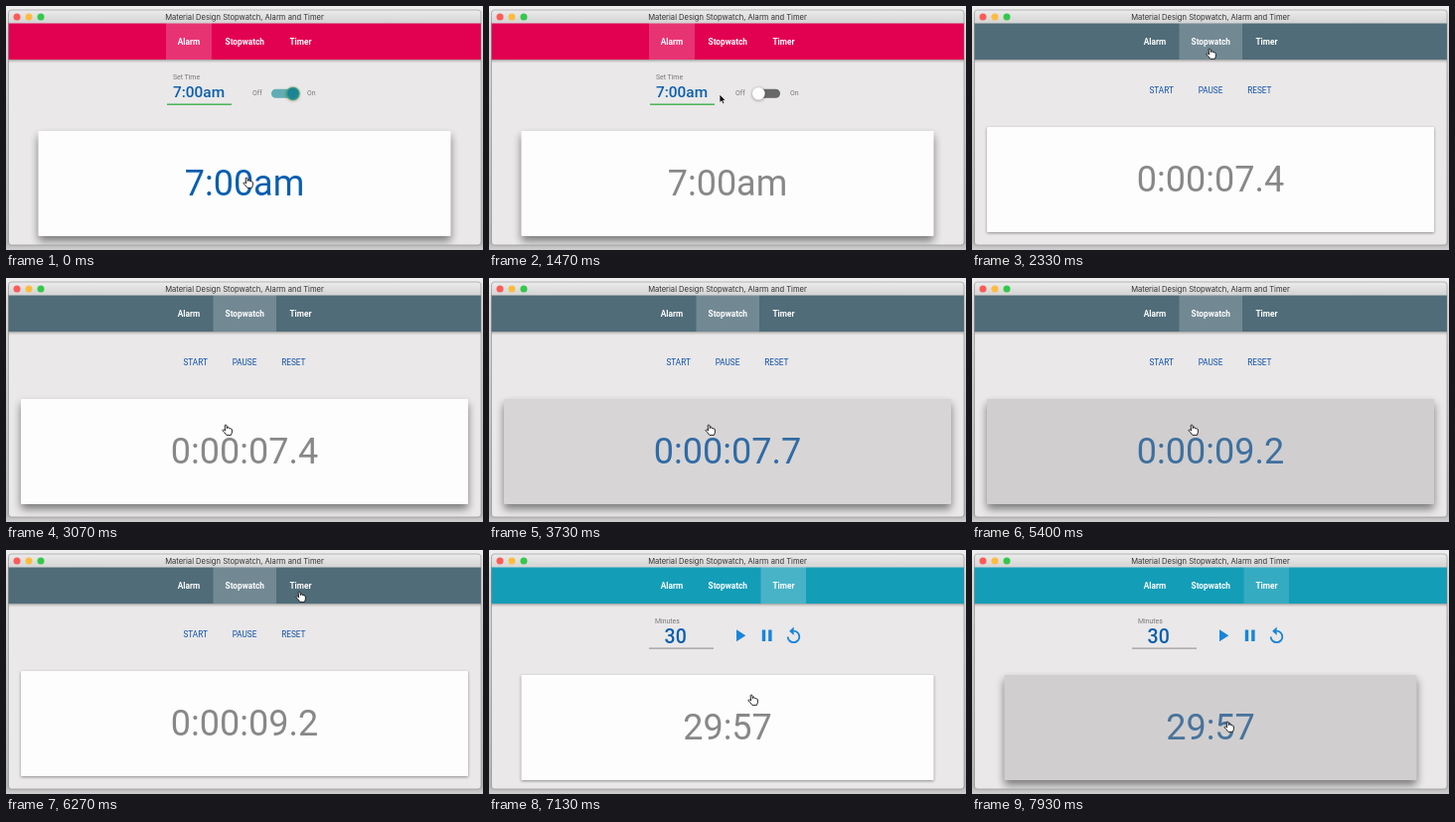
Recreate the animation shown at these times as an HTML page. Size 480x246 px, loop 8 s.

```html
<!DOCTYPE html>
<html lang="en">
<head>
<meta charset="utf-8">
<title>Stopwatch, Alarm and Timer</title>
<style>
  html, body { margin: 0; width: 100%; height: 100%; overflow: hidden; background: #dcdcdc; }
  svg { display: block; width: 100vw; height: 100vh; }
  text { font-family: Roboto, Arial, sans-serif; }
  .title { font: 7.6px Inter, sans-serif; fill: #333; }
  .tab { font-size: 8.3px; font-weight: 600; fill: #fff; }
  .label { font-size: 6.9px; fill: #777; }
  .button { font-size: 8.2px; fill: #0d4fa8; }
  .field { font-weight: 500; fill: #0a5fae; }
  .big { font-size: 36px; }
  .mid { text-anchor: middle; }
  .icon { fill: #1785d8; }
</style>
</head>
<body>
<svg viewBox="0 0 480 246" preserveAspectRatio="none">
  <defs>
    <linearGradient id="bar" x2="0" y2="1">
      <stop stop-color="#ececec"/><stop offset="1" stop-color="#d3d3d3"/>
    </linearGradient>
    <linearGradient id="desk" x2="0" y2="1">
      <stop stop-color="#efefef"/><stop offset=".1" stop-color="#d8d8d8"/>
      <stop offset=".97" stop-color="#b4b4b4"/><stop offset="1" stop-color="#d0d0d0"/>
    </linearGradient>
    <filter id="soft" x="-10%" y="-30%" width="120%" height="160%"><feGaussianBlur stdDeviation="1.5"/></filter>
    <filter id="deep" x="-10%" y="-30%" width="120%" height="160%"><feGaussianBlur stdDeviation="4.5"/></filter>
    <clipPath id="win"><rect x="2.5" y="4" width="475.5" height="237" rx="3"/></clipPath>
  </defs>

  <rect width="480" height="246" fill="url(#desk)"/>
  <g clip-path="url(#win)">
    <rect y="4" width="480" height="240" fill="#eae8e9"/>
    <rect y="17" width="480" height="38" opacity=".4" filter="url(#soft)"/>
    <rect id="head" y="17" width="480" height="37"/>
    <rect id="active" y="17" height="37" fill="#fff"/>
    <g class="mid">
      <text class="tab" x="184" y="38.5">Alarm</text>
      <text class="tab" x="240.3" y="38.5">Stopwatch</text>
      <text class="tab" x="296.5" y="38.5">Timer</text>
    </g>
    <rect y="4" width="480" height="13.5" fill="url(#bar)"/>
    <circle cx="11" cy="11" r="3.5" fill="#fc5b57"/>
    <circle cx="23" cy="11" r="3.5" fill="#fdbc40"/>
    <circle cx="35" cy="11" r="3.5" fill="#34c84a"/>
    <text class="title mid" x="240" y="13.8">Material Design Stopwatch, Alarm and Timer</text>

    <g class="view">
      <text class="label" x="168" y="74">Set Time</text>
      <text class="field" x="168" y="92" font-size="15.4">7:00am</text>
      <rect x="162" y="98.5" width="65" height="1.4" fill="#3cb14a"/>
      <text class="label" x="248" y="90.3">Off</text>
      <text class="label" x="303" y="90.3">On</text>
      <rect id="track" x="267" y="83.7" width="26" height="9" rx="4.5"/>
      <circle cy="89" r="6.8" id="knobShade" opacity=".3" filter="url(#soft)"/>
      <circle id="knob" cy="88.3" r="6.3"/>
    </g>
    <g class="view mid">
      <text class="button" x="190.6" y="88">START</text>
      <text class="button" x="240" y="88">PAUSE</text>
      <text class="button" x="289.3" y="88">RESET</text>
    </g>
    <g class="view">
      <text class="label" x="167" y="74">Minutes</text>
      <text class="field mid" x="187.7" y="93.5" font-size="19.5">30</text>
      <rect x="161" y="98.6" width="65" height="1" fill="#8a8a8a"/>
      <path class="icon" d="M249 80.3V92.2L258.3 86.2ZM274.8 80.5h3.4v11.6h-3.4ZM281.2 80.5h3.4v11.6h-3.4Z"/>
      <path d="M306.5 81.6A5.8 5.8 0 1 1 300.7 87.4" fill="none" stroke="#1785d8" stroke-width="1.8"/>
      <path class="icon" d="M306.7 77.4V86L302.2 81.7Z"/>
    </g>

    <rect class="box" id="low" height="106" fill="#000" filter="url(#soft)"/>
    <rect class="box" id="high" height="106" fill="#000" filter="url(#deep)"/>
    <rect class="box" id="card" height="106" rx="1"/>
    <text class="big mid" id="big" x="240"></text>
  </g>
  <rect x="2.5" y="4" width="475.5" height="237" rx="3" fill="none" stroke="#777" stroke-width=".7" opacity=".7"/>

  <g id="cursor" stroke-linejoin="round">
    <path id="arrow" d="M0 0V8.6L2 6.8L3.4 9.8L5 9.1L3.6 6.2H6.2Z" fill="#111" stroke="#fff" stroke-width=".7"/>
    <path id="hand" d="M-.9 .9C-.9-.3 .9-.3 1 .9L1.4 3.6C2-.1+3.1 3 3.3 3.8C4 3.3 4.9 3.5 5 4.2C5.8 3.9 6.5 4.3 6.5 5.1L6.3 8L5.4 10.4H.9L-1.4 7.5L-2.9 5.9C-3.2 5-2.2 4.5-1.4 5.1L-.4 6Z" fill="#fff" stroke="#111" stroke-width=".9"/>
  </g>
</svg>

<script>
const LOOP = 8;
const $ = id => document.getElementById(id);
const all = sel => [...document.querySelectorAll(sel)];
const set = (el, attrs) => { for (const k in attrs) el.setAttribute(k, attrs[k]); };
const clamp = p => Math.max(0, Math.min(1, p));
const lerp = (a, b, p) => a + (b - a) * p;
const smooth = p => p * p * (3 - 2 * p);
const out = p => 1 - (1 - p) ** 2;
const ramp = (t, from, dur) => clamp((t - from) / dur);
const mix = (a, b, p) => `rgb(${a.map((v, i) => Math.round(lerp(v, b[i], p)))})`;

const GREY = [136, 136, 136], BLUE = [8, 94, 176];
const WHITE = [254, 253, 254], PRESSED = [208, 206, 207];

const VIEWS = [
  { start: 0, color: [226, 0, 80], tab: [161, 46], card: [32.5, 126, 415], base: 191 },
  { start: 2, color: [79, 108, 120], tab: [208.5, 63.5], card: [15, 122, 450], base: 187 },
  { start: 6.45, color: [20, 157, 183], tab: [273.5, 45.5], card: [32.5, 126, 415], base: 191 }
];

const PRESSES = [0.07, 3.36, 5.18, 7.67];
const HOVER = [[0, 1], [1.5, 1], [1.8, 0], [2.6, 0], [2.9, 1], [5.85, 1], [6.15, 0], [7.15, 0], [7.45, 1]];
const POINTER = [
  [0, 242, 173], [1.4, 242, 173], [1.47, 232, 89], [1.72, 239, 43], [2.33, 239, 43], [2.75, 221, 148],
  [5.76, 221, 148], [6.15, 295, 42], [6.67, 295, 42], [7.1, 264, 146], [7.15, 264, 146], [7.42, 257, 173]
];

// Interpolates rows of [time, ...values].
function follow(keys, t) {
  const i = keys.findIndex(k => k[0] > t);
  if (i < 0) return keys[keys.length - 1].slice(1);
  const [a, b] = [keys[i - 1], keys[i]];
  const p = smooth((t - a[0]) / (b[0] - a[0]));
  return a.slice(1).map((v, j) => lerp(v, b[j + 1], p));
}

const flash = (t, at) => ramp(t, at, 0.14) * (1 - ramp(t, at + 0.32, 0.34));
const tint = (t, at, dur = 0.75) => out(ramp(t, at + 0.04, dur));

function reading(view, t) {
  if (view === 0) return '7:00am';
  if (view === 2) return '29:57';
  const tenths = Math.floor(74 + 10 * (Math.min(t, 5.23) - Math.min(t, 3.4)) + 1e-6);
  return `0:00:0${Math.floor(tenths / 10)}.${tenths % 10}`;
}

function running(view, t) {
  if (view === 0) return 1 - tint(t, PRESSES[0], 0.8);
  if (view === 1) return tint(t, PRESSES[1]) - tint(t, PRESSES[2]);
  return tint(t, PRESSES[3]);
}

function drawToggle(t) {
  const on = 1 - smooth(ramp(t, 0.35, 0.25));
  const cx = lerp(271.3, 288.8, on);
  set($('track'), { fill: mix([104, 104, 104], [98, 173, 180], on) });
  set($('knob'), {
    cx, fill: mix(WHITE, [28, 132, 150], on),
    stroke: mix([225, 225, 225], [72, 164, 112], on), 'stroke-width': lerp(0.3, 1.2, on)
  });
  set($('knobShade'), { cx });
}

function draw(t) {
  const n = VIEWS.filter(v => t >= v.start).length - 1;
  const view = VIEWS[n], before = VIEWS[Math.max(0, n - 1)];
  const [x, y, width] = view.card;

  set($('head'), { fill: mix(before.color, view.color, n ? ramp(t, view.start, 0.25) : 1) });
  set($('active'), {
    x: view.tab[0], width: view.tab[1],
    opacity: n === 2 ? lerp(0.22, 0.14, ramp(t, 7.45, 0.08)) : 0.2
  });
  all('.view').forEach((g, i) => set(g, { display: i === n ? 'inline' : 'none' }));
  drawToggle(t);

  const [lift] = follow(HOVER, t);
  all('.box').forEach(b => set(b, { x, y, width }));
  set($('low'), { y: y + 1, opacity: 0.4 * (1 - lift) });
  set($('high'), { y: y + 5, opacity: 0.48 * lift });
  const press = Math.max(...PRESSES.map(at => flash(t, at)));
  set($('card'), { fill: mix(WHITE, PRESSED, press) });

  $('big').textContent = reading(n, t);
  set($('big'), { y: view.base, fill: mix(GREY, BLUE, running(n, t)) });

  const [px, py] = follow(POINTER, t);
  const link = py < 54 || py > y;
  set($('cursor'), { transform: `translate(${px} ${py})` });
  set($('hand'), { display: link ? 'inline' : 'none' });
  set($('arrow'), { display: link ? 'none' : 'inline' });
}

const began = performance.now();
function tick() {
  draw((performance.now() - began) / 1000 % LOOP);
  requestAnimationFrame(tick);
}
tick();
</script>
</body>
</html>
```
